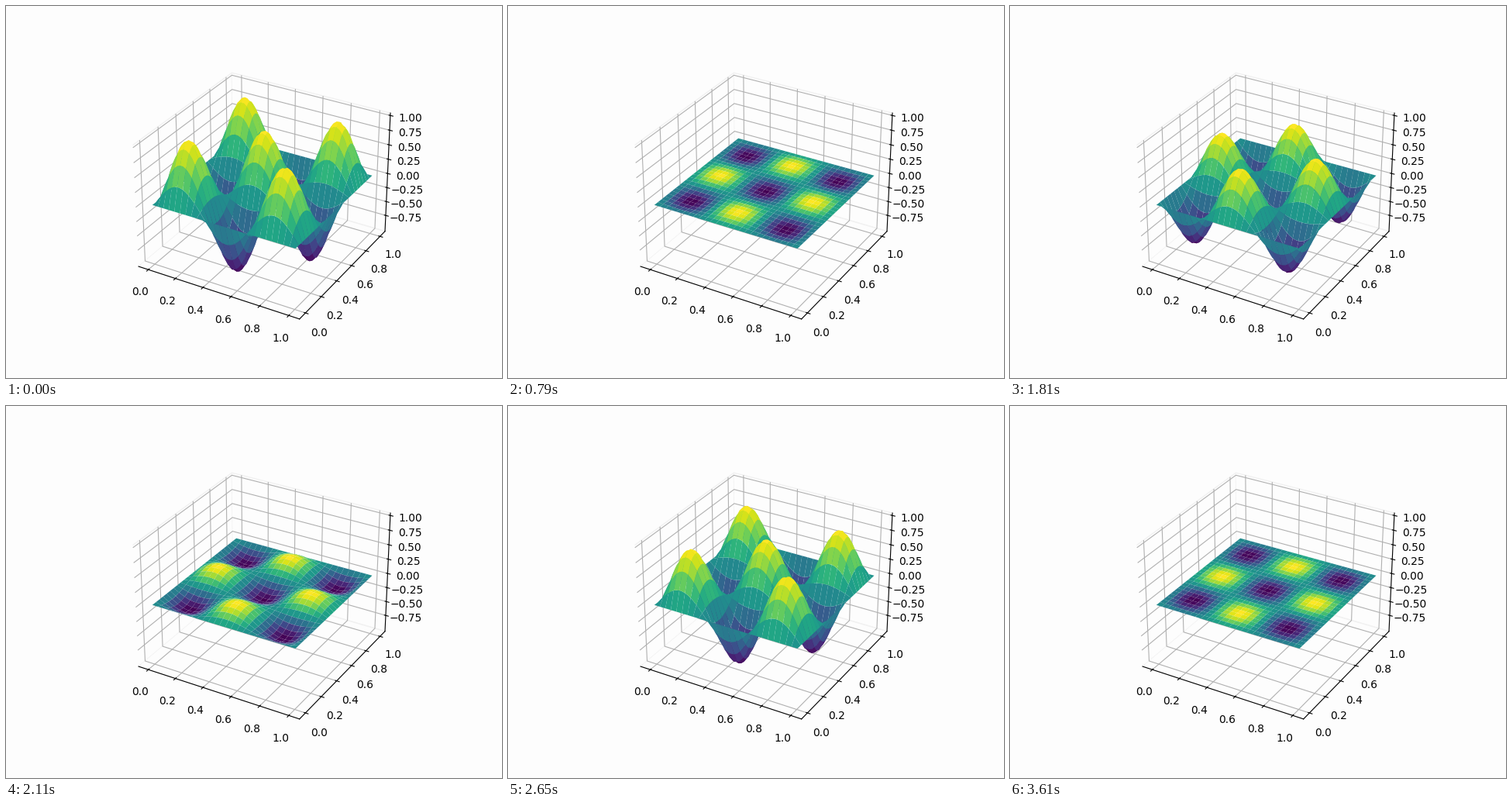
Write a matplotlib script that moves like this. It is 640 px wide and 480 px high and loops after 3.67 s.

```python
import numpy as np
import matplotlib.pyplot as plt
from matplotlib.animation import FuncAnimation

LOOP_MS = 3670
FRAMES = 61
DT = 0.01                       # wave time per step
MODE = 3                        # half waves along each side
OMEGA = np.pi * MODE * np.sqrt(2)
PAPER = "#fdfdfd"
PANE_EDGE = "#f1f1f1"

side = np.linspace(0, 1, 51)
X, Y = np.meshgrid(side, side)
SHAPE = np.sin(MODE * np.pi * X) * np.sin(MODE * np.pi * Y)


def padded(lo, hi):
    pad = (hi - lo) / 48
    return lo - pad, hi + pad


fig = plt.figure(figsize=(6.4, 4.8), dpi=100, facecolor=PAPER)
ax = fig.add_subplot(projection="3d", facecolor=PAPER)
surface = None


def style_axes():
    ax.set_xlim(*padded(-0.05, 1.05))
    ax.set_ylim(*padded(-0.05, 1.05))
    ax.set_zlim(*padded(SHAPE.min(), SHAPE.max()))
    ax.set_xticks(np.linspace(0, 1, 6))
    ax.set_yticks(np.linspace(0, 1, 6))
    ax.set_zticks(np.linspace(-0.75, 1, 8))
    for axis in (ax.xaxis, ax.yaxis, ax.zaxis):
        axis.pane.set_facecolor(PAPER)
        axis.pane.set_edgecolor(PANE_EDGE)
        axis.pane.set_alpha(1)
    ax.set_autoscale_on(False)


def draw(i):
    global surface
    if surface is not None:
        surface.remove()
    # the second step is held for two ticks
    step = i if i < 2 else i - 1
    height = SHAPE * np.cos(OMEGA * DT * step)
    surface = ax.plot_surface(X, Y, height, cmap="viridis")
    return [surface]


style_axes()
anim = FuncAnimation(fig, draw, frames=FRAMES, init_func=lambda: [],
                     interval=LOOP_MS / FRAMES, repeat=True, repeat_delay=0,
                     blit=False)
plt.show()
```
